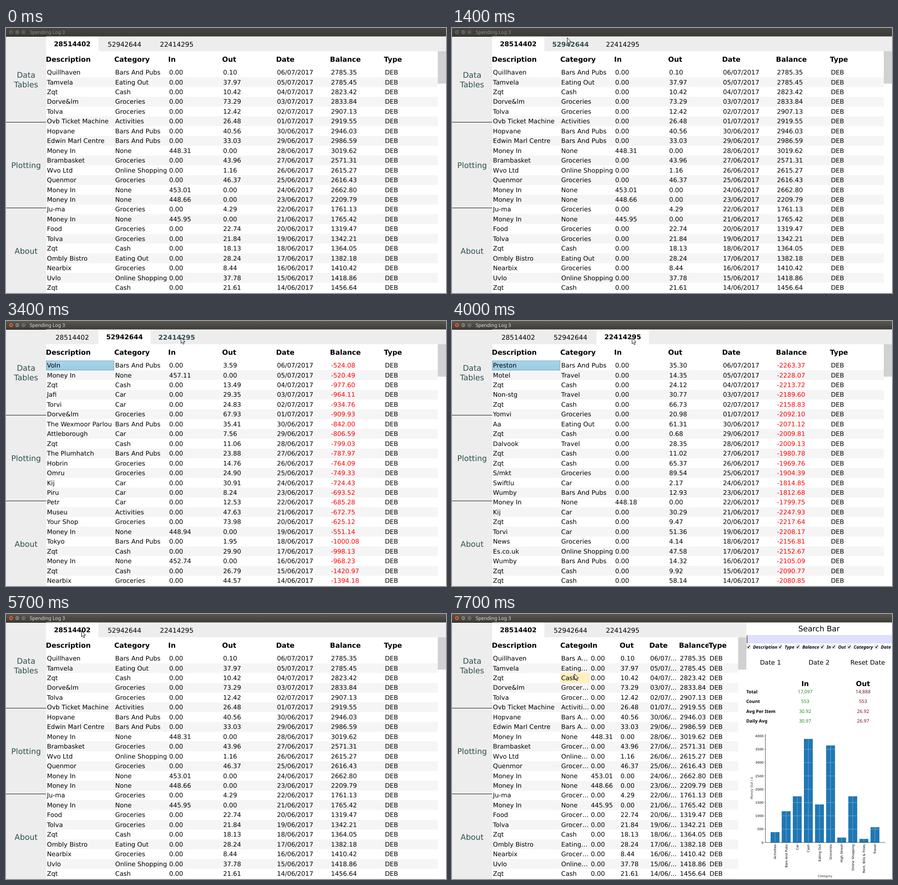
Write an HTML page that moves like this. It is 964x581 px and loops after 8 s.

```html
<!DOCTYPE html>
<html lang="en">
<head>
<meta charset="utf-8">
<title>Spending Log 3</title>
<style>
  html, body { margin: 0; width: 100%; height: 100%; overflow: hidden; background: #fff; }
  svg { display: block; }
  text { font-family: "DejaVu Sans", sans-serif; text-rendering: geometricPrecision; white-space: pre; }
  .ui { font-family: "Noto Sans", "Open Sans", sans-serif; }
</style>
</head>
<body>
<svg id="stage" width="964" height="581" viewBox="0 0 964 581">
  <defs>
    <linearGradient id="barOff" x2="0" y2="1"><stop stop-color="#464540"/><stop offset="1" stop-color="#3b3a36"/></linearGradient>
    <linearGradient id="barOn" x2="0" y2="1"><stop stop-color="#5a5850"/><stop offset="1" stop-color="#3c3b37"/></linearGradient>
    <linearGradient id="picked" x2="0" y2="1"><stop stop-color="#a7d5e9"/><stop offset="1" stop-color="#9bcce1"/></linearGradient>
  </defs>
</svg>
<script>
const LOOP = 8000, ROWS = 23, ROW_TOP = 86.6, ROW_H = 21.45;
const SLATE = '#2f4f4f', GREY = '#ededed';
const ACCOUNTS = ['28514402', '52942644', '22414295'];
const HEADS = ['Description', 'Category', 'In', 'Out', 'Date', 'Balance', 'Type'];
const CATS = {
  B: 'Bars And Pubs', E: 'Eating Out', C: 'Cash', G: 'Groceries',
  A: 'Activities', O: 'Online Shopping', K: 'Car', T: 'Travel'
};

// Rows are name|category|amount out; a leading + marks money in.
const LEDGERS = [
  { start: 2785.35, rows: `Quillhaven|B|0.10;Tamvela|E|37.97;Zqt|C|10.42;Dorve&lm|G|73.29;Tolva|G|12.42;
Ovb Ticket Machine|A|26.48;Hopvane|B|40.56;Edwin Marl Centre|B|33.03;+448.31;Brambasket|G|43.96;
Wvo Ltd|O|1.16;Quenmor|G|46.37;+453.01;+448.66;Ju-ma|G|4.29;+445.95;Food|G|22.74;Tolva|G|21.84;
Zqt|C|18.13;Ombly Bistro|E|28.24;Nearbix|G|8.44;Uvlo|O|37.78;Zqt|C|21.61` },
  { start: -524.08, rows: `Voln|B|3.59;+457.11;Zqt|C|13.49;Jafi|K|29.35;Torvi|K|24.83;Dorve&lm|G|67.93;
The Wexmoor Parlou|B|35.41;Attleborough|K|7.56;Zqt|C|11.06;The Plumhatch|B|23.88;Hobrin|G|14.76;
Omru|G|24.90;Kij|K|30.91;Piru|K|8.24;Petr|K|12.53;Museu|A|47.63;Your Shop|G|73.98;+448.94;
Tokyo|B|1.95;Zqt|C|29.90;+452.74;Zqt|C|26.79;Nearbix|G|44.57` },
  { start: -2263.37, rows: `Preston|B|35.30;Motel|T|14.35;Zqt|C|24.12;Non-stg|T|30.77;Zqt|C|66.73;Yomvi|G|20.98;
Aa|E|61.31;Zqt|C|0.68;Dalvook|T|28.35;Zqt|C|11.02;Zqt|C|65.37;S/mkt|G|89.54;Swiftlu|K|2.17;
Wumby|B|12.93;+448.18;Kij|K|30.29;Zqt|C|9.47;Torvi|K|51.36;News|G|4.14;Es.co.uk|O|47.58;
Wumby|B|14.32;Zqt|C|9.92;Zqt|C|58.14` }
];

// Pointer stops: time, x, y
const POINTER = [
  [400, 14, 104], [500, 42, 94], [600, 78, 82], [700, 124, 73], [800, 156, 69],
  [1000, 164, 66], [1100, 190, 57], [1200, 218, 43], [1300, 240, 28], [1400, 252, 21],
  [1500, 253, 24], [1600, 252, 30], [1700, 252, 36],
  [2700, 253, 38], [2800, 254, 39], [2900, 255, 40],
  [3100, 275, 39], [3200, 312, 37], [3300, 352, 36], [3400, 383, 36], [3500, 394, 37],
  [4700, 362, 36], [4800, 285, 34], [4900, 205, 33], [5000, 167, 33], [5200, 166, 35], [5300, 165, 37],
  [6000, 178, 45], [6100, 214, 69], [6200, 250, 112], [6300, 268, 131]
];
const TABS = [[0, 0], [2400, 1], [4000, 2], [5700, 0]];
const FOCUS_AT = 2300, PANEL_AT = 7700;

const stage = document.getElementById('stage');

function add(parent, tag, attrs = {}) {
  const node = document.createElementNS('http://www.w3.org/2000/svg', tag);
  for (const key in attrs) node.setAttribute(key, attrs[key]);
  return parent.appendChild(node);
}
const group = parent => add(parent, 'g');
const box = (parent, x, y, width, height, fill, more) =>
  add(parent, 'rect', { x, y, width, height, fill, ...more });
const line = (parent, x1, y1, x2, y2, stroke, width = 1) =>
  add(parent, 'path', { d: `M${x1} ${y1}L${x2} ${y2}`, stroke, 'stroke-width': width, fill: 'none' });
function label(parent, x, y, str, size, more) {
  const node = add(parent, 'text', { x, y, 'font-size': size, ...more });
  node.textContent = str;
  return node;
}
const MID = { 'text-anchor': 'middle' }, BOLD = { 'font-weight': 700 };
const show = (node, on) => { node.style.display = on ? '' : 'none'; };

const pen = document.createElement('canvas').getContext('2d');
pen.font = '100px "DejaVu Sans", sans-serif';
function elide(str, size, room) {
  const fits = s => pen.measureText(s).width * size / 100 <= room;
  if (fits(str)) return str;
  while (str && !fits(str + '…')) str = str.slice(0, -1);
  return str + '…';
}

const columns = right => Array.from({ length: 8 }, (_, i) => i ? 237 + (right - 237) * (i - 1) / 6 : 87.5);
const WIDE = columns(946), NARROW = columns(627);

function parse({ start, rows }) {
  let balance = start;
  return rows.split(';').map((row, i) => {
    const [name, cat, sum] = row.trim().split('|');
    const income = name[0] === '+' ? +name.slice(1) : 0;
    const out = income ? 0 : +sum;
    const date = new Date(Date.UTC(2017, 6, 6 - i)).toISOString().slice(0, 10).split('-').reverse().join('/');
    const cells = [income ? 'Money In' : name, income ? 'None' : CATS[cat],
      income.toFixed(2), out.toFixed(2), date, balance.toFixed(2), 'DEB'];
    balance += out - income;
    return cells;
  });
}

function drawTable(rows, cols) {
  const g = group(stage);
  HEADS.forEach((head, c) => {
    const cell = add(g, 'svg', { x: cols[c], y: 52, width: cols[c + 1] - cols[c], height: 34 });
    label(cell, c ? .2 : -.2, 22.2, head, 15.2, BOLD);
  });
  rows.forEach((cells, r) => cells.forEach((str, c) => {
    const room = cols[c + 1] - cols[c] - 3.3;
    label(g, cols[c] + 2.3, ROW_TOP + ROW_H * r + 15.5, elide(str, 13.78, room), 13.78,
      { fill: c === 5 && str[0] === '-' ? '#f00' : '#000' });
  }));
  return g;
}

function drawTitle(focused) {
  const g = group(stage);
  box(g, 0, 0, 964, 18.5, focused ? 'url(#barOn)' : 'url(#barOff)');
  const mark = focused ? '#3a3933' : '#3c3b37', ring = focused ? '#85837b' : '#696863';
  [11, 24.7, 38.3].forEach((x, i) => add(g, 'circle', {
    cx: x, cy: 9, r: 4.9, fill: focused && !i ? '#ee6338' : ring, stroke: '#32312d', 'stroke-width': .8
  }));
  line(g, 9, 7, 13, 11, mark, 1.1);
  line(g, 13, 7, 9, 11, mark, 1.1);
  line(g, 22.2, 9, 27.2, 9, mark, 1.1);
  box(g, 36.2, 7, 4.2, 4, 'none', { stroke: mark });
  label(g, 52, 12.8, 'Spending Log 3', 10.6,
    { class: 'ui', 'font-weight': 500, fill: focused ? '#e6e2d9' : '#929089' });
  return g;
}

function drawChart(g) {
  const x0 = 686.5, y0 = 501, perUnit = 29.2 / 500;
  const bars = [['Activities', 390], ['Bars And Pubs', 1175], ['Car', 1735], ['Cash', 3890], ['Eating Out', 1430],
    ['Groceries', 3645], ['High Street', 185], ['Online Shopping', 1735], ['Rent, Bills & Fines', 135], ['Travel', 575]];
  bars.forEach(([name, value], i) => {
    const mid = 707.8 + 24.32 * i, top = y0 - value * perUnit;
    box(g, mid - 9.75, top, 19.5, y0 - top, '#1f77b4');
    line(g, mid, top, mid, y0, '#a5c9e1', .6);
    for (let v = 500; v < value; v += 500)
      line(g, mid - 9.75, y0 - v * perUnit, mid + 9.75, y0 - v * perUnit, '#a5c9e1', .6);
    line(g, mid, y0, mid, y0 + 2.4, '#333', .6);
    label(g, 0, 0, name, 7.05, { 'text-anchor': 'end', transform: `translate(${mid + 2.6} 505) rotate(-90)` });
  });
  for (let v = 0; v <= 4000; v += 500) {
    const y = y0 - v * perUnit;
    line(g, x0 - 2.4, y, x0, y, '#333', .6);
    label(g, 682.6, y + 2.6, v, 7.1, { 'text-anchor': 'end' });
  }
  line(g, x0, 263, x0, y0, '#222', .8);
  line(g, x0, y0, 949, y0, '#222', .8);
  label(g, 0, 0, 'Money Out / £', 6.95, { ...MID, fill: '#333', transform: 'translate(659.4 381.5) rotate(-90)' });
  label(g, 817.2, 577.4, 'Category', 7, { ...MID, fill: '#333' });
}

function drawPanel() {
  const g = group(stage);
  box(g, 645, 18.5, 319, 563, '#fff');
  label(g, 804, 38, 'Search Bar', 16.6, MID);
  box(g, 646, 46, 318, 18.5, '#dfdfff');
  line(g, 646.5, 47, 646.5, 64, '#000');
  [['Description', 645], ['Type', 714.3], ['Balance', 753], ['In', 806.3], ['Out', 831.5], ['Category', 865.6], ['Date', 925.2]]
    .forEach(([name, x]) => {
      box(g, x + .5, 67.5, 8.4, 8.6, '#fff', { stroke: '#aaa', 'stroke-width': .7, rx: 1.2 });
      add(g, 'path', { d: `M${x + 2.4} 71.6l1.8 2.6l3-5`, stroke: '#000', 'stroke-width': 1.4, fill: 'none' });
      label(g, x + 14.4, 75.8, name, 9.9, { class: 'ui', 'font-style': 'italic', 'font-weight': 600 });
    });
  [['Date 1', 697.7], ['Date 2', 804.2], ['Reset Date', 910.7]]
    .forEach(([name, x]) => label(g, x, 111, name, 13.8, MID));
  label(g, 773.7, 158.3, 'In', 15.2, { ...MID, ...BOLD });
  label(g, 900.6, 158.3, 'Out', 15.2, { ...MID, ...BOLD });
  [['Total', '17,097', '14,888'], ['Count', '553', '553'], ['Avg Per Item', '30.92', '26.92'], ['Daily Avg', '30.97', '26.97']]
    .forEach(([name, income, out], i) => {
      const y = 173.9 + 21.4 * i;
      label(g, 644.8, y, name, 9.9, { class: 'ui', ...BOLD });
      label(g, 773.7, y, income, 10.4, { class: 'ui', ...MID, fill: '#228b22' });
      label(g, 900.6, y, out, 10.4, { class: 'ui', ...MID, fill: '#7a1020' });
    });
  drawChart(g);
  return g;
}

// Fixed backdrop
box(stage, 0, 18.5, 964, 562.5, '#fff');
box(stage, 88, 18.5, 876, 32.3, GREY);
const sideItem = box(stage, 0, 18, 88, 189, GREY);
box(stage, 0, 207, 88, 374, GREY);
[['Data', 108.8], ['Tables', 129.8], ['Plotting', 307], ['About', 495]]
  .forEach(([name, y]) => label(stage, 44, y, name, 17, { ...MID, fill: SLATE }));
for (let r = 1; r <= ROWS; r += 2) box(stage, 88, ROW_TOP + ROW_H * r, 858, ROW_H, '#f5f5f5');

const tabX = i => 88 + 114.4 * i;
const activeTab = box(stage, 88, 18.5, 114.4, 32.5, '#fff');
const tabText = ACCOUNTS.map((name, i) => label(stage, tabX(i) + 57.2, 41, name, 14.45, MID));
const gutter = box(stage, 627, 51, 337, 530, '#fff');
const handle = box(stage, 946, 51, 18, 71, '#d1d1d1');
const hoverCell = box(stage, 0, 0, 0, ROW_H, '#ffefbd');
const picked = box(stage, 88.5, 87.2, 148.2, 20.6, 'url(#picked)', { stroke: '#6ba3c8' });

const ledgers = LEDGERS.map(parse);
const tables = ledgers.map(rows => drawTable(rows, WIDE));
const narrowTable = drawTable(ledgers[0], NARROW);
const panel = drawPanel();
const titles = [drawTitle(false), drawTitle(true)];
for (const y of [18.5, 206.5, 394.5]) line(stage, 0, y, 88, y, '#111');
const arrow = add(stage, 'path', {
  d: 'M.5 .5V13L3.3 10.4L5.3 15L7.5 14L5.5 9.6H9.4Z', fill: '#fff', stroke: '#111', 'stroke-width': 1
});

const latest = (steps, t) => steps.filter(s => s[0] <= t).pop();

function render(t) {
  const tab = latest(TABS, t)[1], open = t >= PANEL_AT, focused = t >= FOCUS_AT;
  const [, x, y] = latest(POINTER, t) || [0, -50, -50];
  const cols = open ? NARROW : WIDE;

  titles.forEach((node, i) => show(node, focused === !!i));
  tables.forEach((node, i) => show(node, !open && i === tab));
  [narrowTable, panel, gutter].forEach(node => show(node, open));
  handle.setAttribute('x', open ? 627 : 946);
  show(picked, tab > 0);

  activeTab.setAttribute('x', tabX(tab));
  tabText.forEach((node, i) => {
    const over = y > 18 && y < 51 && x >= tabX(i) && x < tabX(i + 1);
    node.setAttribute('y', i === tab ? 40 : 41);
    node.setAttribute('font-weight', over || i === tab ? 700 : 400);
    node.setAttribute('fill', over && i !== tab ? SLATE : '#000');
  });

  sideItem.setAttribute('fill', x >= 0 && x < 88 && y < 207 ? '#dcdcdc' : GREY);
  const row = Math.floor((y - ROW_TOP) / ROW_H);
  const col = cols.findIndex((left, i) => x >= left && x < cols[i + 1]);
  show(hoverCell, row >= 0 && col >= 0);
  if (row >= 0 && col >= 0) {
    hoverCell.setAttribute('x', cols[col]);
    hoverCell.setAttribute('y', ROW_TOP + ROW_H * row);
    hoverCell.setAttribute('width', cols[col + 1] - cols[col]);
  }
  arrow.setAttribute('transform', `translate(${x} ${y})`);
}

const began = performance.now();
function tick() {
  render((performance.now() - began) % LOOP);
  requestAnimationFrame(tick);
}
tick();
</script>
</body>
</html>
```
